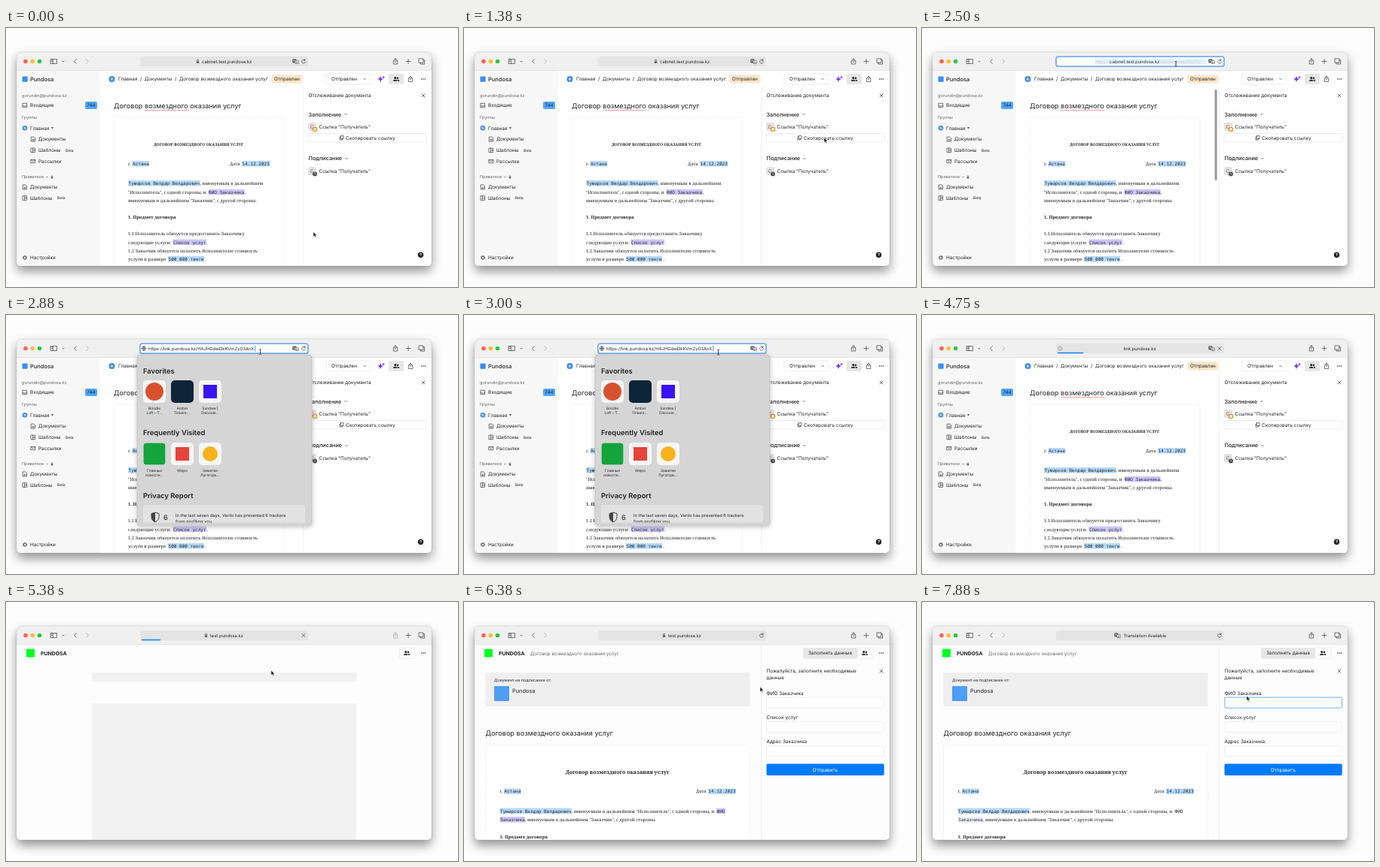
Animation, 600 px wide and 345 px high, one loop 8.01 s. Source, as an HTML page:

```html
<!DOCTYPE html>
<html lang="ru">
<head>
<meta charset="utf-8">
<title>Отправка документа</title>
<style>
  html, body { margin: 0; width: 100%; height: 100%; overflow: hidden; background: #fdfdfd; }
  svg { display: block; width: 100vw; height: 100vh; }
  text { font-family: Inter, Roboto, sans-serif; fill: #222; text-rendering: geometricPrecision; white-space: pre; }
  .serif { font-family: "Noto Serif", "Liberation Serif", serif; }
  .mono { font-family: "Noto Sans Mono", "DejaVu Sans Mono", monospace; }
  .mid { text-anchor: middle; }
  .bold { font-weight: 700; }
  .semi { font-weight: 600; }
  .medium { font-weight: 500; }
  .grey { fill: #666; }
  .line { fill: none; stroke: #444; stroke-width: .75; stroke-linecap: round; stroke-linejoin: round; }
  .pale { stroke: #aaa; }
</style>
</head>
<body>
<svg id="stage" viewBox="0 0 600 345" preserveAspectRatio="none"></svg>
<script>
const LOOP = 8010, STEP = 125, END = 9000;
const BLUE = '#b5d9fb', VIOLET = '#cbc8fb', ACCENT = '#007aff';
const TITLE = 'Договор возмездного оказания услуг';

// Markup helpers
const text = (x, y, s, size = 6.4, cls = '', extra = '') =>
  `<text x="${x}" y="${y}" font-size="${size}" class="${cls}" ${extra}>${s}</text>`;
const rect = (x, y, w, h, fill, rx = 0, extra = '') =>
  `<rect x="${x}" y="${y}" width="${w}" height="${h}" rx="${rx}" fill="${fill}" ${extra}/>`;
const box = (x, y, w, h, stroke = '#e6e6e6', fill = '#fff', rx = 2) =>
  rect(x, y, w, h, fill, rx, `stroke="${stroke}" stroke-width=".7"`);
const dot = (x, y, r, fill, extra = '') => `<circle cx="${x}" cy="${y}" r="${r}" fill="${fill}" ${extra}/>`;
const line = (x, y, d, cls = '') => `<path transform="translate(${x} ${y})" class="line ${cls}" d="${d}"/>`;
const serif = (x, y, s, size = 5.85, cls = '') => text(x, y, s, size, 'serif ' + cls);
const field = (x, y, s, fill) =>
  rect(x - .5, y - 5.9, s.length * 3.63 + 1, 7.5, fill, 1) + text(x, y, s, 6.05, 'mono');

// Icons, drawn around their centre
const cross = (x, y) => line(x, y, 'M-2-2L2 2M2-2L-2 2');
const down = (x, y, s = 1.3) => line(x, y, `M${-s} ${-s / 2}L0 ${s / 2}L${s} ${-s / 2}`);
const dots = (x, y) => [-2.3, 0, 2.3].map(d => dot(x + d, y, .75, '#222')).join('');
const page = (x, y) => line(x, y, 'M-2.4-3H1L2.6-1.3V3H-2.4ZM-1 .2H1M-1 1.6H1');
const layout = (x, y) => line(x, y, 'M-2.6-2.8H2.6V2.8H-2.6ZM-.4-2.8V2.8M-.4 0H2.6');
const share = (x, y, cls) => line(x, y, 'M-1.2-1.3H-2.7V3.5H2.7V-1.3H1.2M0 1.2V-3.7M-1.5-2.3L0-3.8L1.5-2.3', cls);
const lock = (x, y, s = 1) => `<g transform="translate(${x} ${y}) scale(${s})">` +
  rect(-1.7, -.4, 3.4, 2.9, '#666', .5) + line(0, 0, 'M-1-.4V-1.4A1 1 0 0 1 1-1.4V-.4') + '</g>';
const globe = (x, y) => dot(x, y, 2.7, 'none', 'stroke="#555" stroke-width=".7"') +
  line(x, y, 'M-2.7 0H2.7M0-2.7Q-2.2 0 0 2.7Q2.2 0 0-2.7');
const home = (x, y, r) => dot(x, y, r, '#2c8df0') +
  dot(x, y, r * .4, '#fff') + line(x, y, `M0 ${-r}V${r}M${-r} ${-r / 2}L${r} ${r / 2}`, 'pale');
const people = (x, y) => dot(x - 1.3, y - 1.4, 1.5, '#222') + dot(x + 1.9, y - 1.2, 1.2, '#222') +
  `<path transform="translate(${x} ${y})" fill="#222" d="M-4.2 2.8Q-4.2.7-1.3.7T1.5 2.8ZM2.1 2.8Q2.1 1.4 1.4.8Q4.2.4 4.3 2.8Z"/>`;
const translate = (x, y) => box(x - 4, y - 3, 4.8, 4.6, '#666', '#777', 1) + box(x - .5, y - 1.4, 4.5, 4.4, '#666', '#eee', 1) +
  text(x + .5, y + 2.1, 'A', 3.6) + line(x, y, 'M-2.9-1H-.7M-1.8-2V-1', 'pale');
const reload = (x, y) => line(x, y, 'M1.7-1.6A2.4 2.4 0 1 0 2.4.4M2-3V-1.4H.4');

const sideItem = (x, y, icon, label) => icon(x - 7, y - 2.3) + text(x, y, label);

const toolbar = () =>
  rect(14, 32, 551, 25, '#f0f0f0') + rect(14, 56.5, 551, .6, '#dedede') +
  ['#ff5f57', '#febc2e', '#28c840'].map((c, i) => dot(26 + i * 9.3, 44.5, 2.8, c)).join('') +
  line(63.5, 44.5, 'M-4-3H4V3H-4ZM-1.2-3V3M-3-1.5H-2.2M-3 0H-2.2') + down(76, 44.7, 1.1) +
  line(92, 44.5, 'M1.3-2.8L-1.5 0L1.3 2.8') + line(108, 44.5, 'M-1.3-2.8L1.5 0L-1.3 2.8', 'pale') +
  rect(178, 38, 223, 13.3, '#e4e4e4', 3) +
  line(534, 44.5, 'M-3 0H3M0-3V3') + line(552, 44.5, 'M-3.6-3.6H1.8V1.8H-3.6ZM1.8-1.8H3.6V3.6H-1.8V1.8');

const sidebar = () =>
  rect(14, 57, 110.5, 260, '#f7f7f7') + rect(21.5, 64.5, 7.2, 7.2, '#3a8ff0', 1) +
  text(32, 71, 'Pundosa', 7.5, 'medium') + text(21, 92, 'gorundin@pundosa.kz', 5.6, 'grey') +
  sideItem(32, 105.3, (x, y) => line(x, y, 'M-2.7-2.7H2.7V2.7H-2.7ZM-2.7.7H-1Q0 2.4 1 .7H2.7'), 'Входящие') +
  rect(105, 98, 16, 10, '#4fa8fa', 2) + text(113, 105.3, '744', 6.4, 'mid') +
  text(21, 121.3, 'Группы', 5.5, 'grey') + sideItem(32, 135.6, (x, y) => home(x, y, 3.3), 'Главная') +
  '<path d="M59.8 132.2h3.4l-1.7 2.1z" fill="#333"/>' +
  sideItem(43, 150.4, page, 'Документы') + sideItem(43, 165.2, layout, 'Шаблоны') + text(79, 164.7, 'Beta', 5) +
  sideItem(43, 179.8, (x, y) => line(x, y, 'M-2.8-2H2.8V2.2H-2.8ZM-2.8-2L0 .6L2.8-2'), 'Рассылки') +
  text(21, 200.4, 'Приватное', 5.5, 'grey') + down(54.5, 198.6, .8) + lock(61, 198.6, .8) +
  sideItem(32, 214.2, page, 'Документы') + sideItem(32, 228.8, layout, 'Шаблоны') + text(68, 228.3, 'Beta', 5) +
  sideItem(32, 308.2, (x, y) => dot(x, y, 2.3, 'none', 'stroke="#555" stroke-width="1.3" stroke-dasharray="1.2 .6"') +
    dot(x, y, 1.6, 'none', 'stroke="#555" stroke-width=".7"'), 'Настройки');

const recipient = y => rect(401, y, 11, 11, '#e2e2e2', 2.5) + text(406, y + 7.8, 'С', 6.4, 'mid grey');

const tracking = () =>
  rect(394.6, 79, .6, 238, '#e4e4e4') +
  box(425, 61, 59, 14) + text(432, 70.3, 'Отправлен') + down(476, 68) +
  '<path d="M497 63.5Q497.5 67.5 501 68Q497.5 68.5 497 72.5Q496.500 68.500 493 68Q496.500 67.500 497 63.500ZM501 63.500l.6 1.600 1.600.6-1.600.6-.6 1.600-.6-1.600-1.600-.6 1.600-.6z" fill="#7a3cf0"/>' +
  rect(508, 61, 20, 14, '#e6e6e6', 2) + people(518, 68) + share(537, 68) + dots(554, 68) +
  text(401.5, 92.3, 'Отслеживание документа', 6.5) + cross(554, 90) +
  text(401.5, 117.6, 'Заполнение', 7.3, 'medium') + down(451, 115) +
  recipient(126) + dot(410, 135, 2.6, '#fff', 'stroke="#f08c1a" stroke-width="1.4"') + text(415.5, 133.8, 'Ссылка "Получатель"') +
  box(401, 140.5, 157.5, 11.5) + line(445.5, 146.3, 'M-1-2.700H2.500V1.200H-1ZM-1-1.200H-2.500V2.700H1V1.200') +
  text(451, 148.500, 'Скопировать ссылку') +
  text(401.5, 176.4, 'Подписание', 7.3, 'medium') + down(452, 174) +
  recipient(185) + dot(410, 194.5, 3, '#555') + line(410, 194.5, 'M0-1.500V0H1.200', 'pale') + text(415.5, 192.6, 'Ссылка "Получатель"') +
  dot(550.5, 302.3, 3.7, '#222') + text(550.5, 304.4, '?', 5.5, 'mid bold', 'style="fill:#fff"');

const cabinet = () =>
  rect(14, 57, 551, 260, '#fff') + sidebar() + home(140.5, 68, 4) +
  text(149, 70.3, 'Главная') + text(178, 70.3, '/') + text(184, 70.3, 'Документы') + text(224, 70.3, '/') +
  text(230, 70.3, TITLE, 6.35) + rect(352.5, 62.5, 41, 11, '#fde6c8', 2) + text(356, 70.3, 'Отправлен', 6.35) +
  text(143, 106.8, TITLE, 9.15) +
  '<path d="M185 109.500H243" stroke="#f04848" stroke-width="1" stroke-dasharray="1 1"/>' +
  rect(143, 119, 226, 220, '#fff', 1, 'stroke="#e8e8e8" stroke-width=".7" stroke-dasharray="2 1"') +
  serif(255.5, 156.5, TITLE.toUpperCase(), 5.2, 'bold mid') +
  serif(162, 183, 'г.') + field(168, 183, 'Астана', BLUE) + serif(297, 183, 'Дата') + field(313.5, 183, '14.12.2023', BLUE) +
  field(162.5, 209, 'Тумарсов Велдар Велдарович', BLUE) + serif(257.5, 209, ', именуемым в дальнейшем') +
  serif(162, 220.7, '"Исполнитель", с одной стороны, и') + field(269, 220.7, 'ФИО Заказчика', VIOLET) + serif(317, 220.7, ',') +
  serif(162, 232.3, 'именуемым в дальнейшем "Заказчик", с другой стороны.') +
  serif(162, 254.4, '1. Предмет договора', 5.85, 'bold') +
  serif(162, 276.3, '1.1 Исполнитель обязуется предоставить Заказчику') +
  serif(162, 287.5, 'следующие услуги:') + field(222, 287.5, 'Список услуг', VIOLET) + serif(267, 287.5, '.') +
  serif(162, 298.8, '1.2 Заказчик обязуется оплатить Исполнителю стоимость') +
  serif(162, 310, 'услуги в размере') + field(215.5, 310, '500 000 тенге', BLUE) + serif(264.5, 310, '.') + tracking();

const linkHeader = () =>
  rect(14, 57, 551, 260, '#fdfdfd') + rect(27, 62.5, 11, 11, '#0f2', 1) +
  text(46, 70.8, 'PUNDOSA', 6.9, 'bold') + box(522, 61, 21, 14.5) + people(532, 68) + dots(554, 68);

const skeleton = () => rect(114, 94, 351, 12, '#f0f0f0') + rect(114, 135, 351, 182, '#f2f2f2');

const formRow = (y, label) => text(401.5, y, label) + box(401.8, y + 3.6, 155.700, 14);

const form = () =>
  text(88, 70.6, TITLE, 6.35, 'grey') + rect(394.6, 57, .6, 260, '#e2e2e2') +
  rect(450, 61, 72, 14.5, '#e6e6e6', 2) + text(486, 70.4, 'Заполнить данные', 6.4, 'mid') +
  rect(28.5, 94, 351, 45, '#efefef', 1) + text(40, 106.3, 'Документ на подписание от:', 5.4) +
  rect(40, 112, 20, 20, '#4f9df5', 1) + text(64, 121, 'Pundosa', 7.4) + text(28.5, 178, TITLE, 9.15) +
  rect(28.5, 191, 351, 140, '#fff', 1, 'stroke="#e8e8e8" stroke-width=".7" stroke-dasharray="2 1"') +
  serif(203.7, 228.5, TITLE, 7, 'bold mid') +
  serif(47.5, 254.3, 'г.') + field(53.5, 254.3, 'Астана', BLUE) + serif(308, 254.3, 'Дата') + field(324.3, 254.3, '14.12.2023', BLUE) +
  field(48, 280.5, 'Тумарсов Велдар Велдарович', BLUE) +
  serif(143, 280.5, ', именуемым в дальнейшем "Исполнитель", с одной стороны, и') +
  serif(81, 292, ', именуемым в дальнейшем "Заказчик", с другой стороны.') +
  serif(47.5, 314.5, '1. Предмет договора', 5.85, 'bold') +
  text(401.5, 94, 'Пожалуйста, заполните необходимые') + text(401.5, 103, 'данные') + cross(554, 92) +
  formRow(123.5, 'ФИО Заказчика') + formRow(155.8, 'Список услуг') + formRow(188, 'Адрес Заказчика') +
  rect(401.5, 215.5, 156.2, 15.5, ACCENT, 2) + text(479.5, 225.6, 'Отправить', 6.4, 'mid', 'style="fill:#fff"');

const customer = fill => field(335.5, 280.5, 'ФИО', fill) + field(48, 292, 'Заказчика', fill);

const address = (x, s, extra) => text(x, 46.8, s, 5.85, '', extra);
const focusRing = () => rect(178, 38.2, 223, 13, '#fff', 3, 'stroke="#76b0f2" stroke-width="1.800"');

const tile = (i, y, shape, first, second) => {
  const x = 182 + i * 37;
  return rect(x, y, 30, 30, '#f6f6f6', 5) + shape(x + 15, y + 15) +
    text(x + 15, y + 38.5, first, 4.8, 'mid') + text(x + 15, y + 44.5, second, 4.8, 'mid');
};
const square = (size, fill, rx = 0) => (x, y) => rect(x - size / 2, y - size / 2, size, size, fill, rx);
const circle = (r, fill) => (x, y) => dot(x, y, r, fill);

const startPanel = () =>
  rect(174, 53, 232, 227, '#d5d5d5', 4, 'stroke="#b8b8b8" stroke-width=".6" filter="url(#soft)"') +
  text(182, 77.5, 'Favorites', 9.4, 'semi') +
  tile(0, 87, circle(12, '#d8512f'), 'Brindle', 'Loft – T...') +
  tile(1, 87, square(30, '#0e2439', 5), 'Amber', 'Tinkers:...') +
  tile(2, 87, square(18, '#3a13f5'), 'Sundew |', 'Discover...') +
  text(182, 160, 'Frequently Visited', 9.4, 'semi') +
  tile(0, 170, square(29, '#15a33c', 4), 'Главные', 'новости...') +
  tile(1, 170, square(18, '#e5443a'), 'Wispo', '') +
  tile(2, 170, circle(10, '#f8b21c'), 'Заметки', 'Лугогорь...') +
  text(182, 243.5, 'Privacy Report', 9.4, 'semi') +
  '<g clip-path="url(#report)">' + rect(182, 253, 215, 40, '#e2e2e2', 4) +
  '<path d="M198 263l5 1.500v4q0 5-5 7.500q-5-2.500-5-7.500v-4z" fill="none" stroke="#444" stroke-width="1"/><path d="M198 263v13q-5-2.500-5-7.500v-4z" fill="#444"/>' +
  text(209, 273, '6', 9.4) + text(225, 268.5, 'In the last seven days, Verilo has prevented 6 trackers', 5.75) +
  text(225, 276.5, 'from profiling you.', 5.75) + '</g>';

// [from, to, markup] in drawing order
const scenes = [
  [0, 4875, cabinet()],
  [2250, 2750, rect(388.6, 82, 3, 121, '#999', 1.5)],
  [4875, END, linkHeader()],
  [5000, 5875, skeleton()],
  [5875, END, form()],
  [5875, 7250, customer(VIOLET)],
  [7250, END, customer('#eeeefc') + rect(401.8, 127.1, 155.7, 14, '#fff', 2, 'stroke="#8cc4fb" stroke-width="1.300"')],
  [0, END, toolbar()],
  [0, 4875, share(517, 44.5)],
  [4875, 5875, share(517, 44.5, 'pale')],
  [5875, END, share(517, 44.5)],
  [0, 2500, lock(254.5, 44.6) + address(260, 'cabinet.test.pundosa.kz')],
  [2500, 3625, focusRing()],
  [2500, 2625, rect(230, 40.7, 148, 8, '#dbeafb', 0, 'opacity=".6"') +
    address(230, 'https://cabinet.test.pundosa.kz/documents/48213/', 'opacity=".2"') + address(249, 'cabinet.test.pundosa.kz', 'opacity=".8"')],
  [2625, 2875, rect(188.5, 40.7, 143, 8, '#b3d6fb') + globe(183, 44.6) + address(189, 'https://cabinet.test.pundosa.kz/documents/48213/')],
  [2750, 3625, startPanel()],
  [2875, 3625, globe(183, 44.6) + address(189, 'https://link.pundosa.kz/HAJHGdeiDkKVmZy03AnX') + rect(330.5, 41, .8, 7.500, ACCENT)],
  [0, 4875, translate(384.5, 44.6)],
  [0, 3625, reload(395, 44.6)],
  [3625, 4875, dot(183.5, 44.6, 2.6, 'none', 'stroke="#888" stroke-width=".7"') + line(183.5, 44.6, 'M0-1.200V1.200', 'pale') + address(267.5, 'link.pundosa.kz')],
  [3625, 6000, cross(395, 44.6)],
  [4875, 6750, lock(265.5, 44.6) + address(271, 'test.pundosa.kz')],
  [6000, END, reload(395, 44.6)],
  [6750, END, translate(259.5, 44.6) + address(267.5, 'Translation Available')]
];

const loading = [[3625, 14], [3750, 23], [4750, 34], [4874, 34], [4875, 14], [5375, 25], [5625, 60], [5875, 219]];
const pointer = [[0, 408, 271.5], [125, 408, 271.5], [1000, 478, 146], [1500, 478, 146], [2250, 337, 47.5],
  [4875, 340, 58], [5375, 352, 91], [5750, 352, 91], [6375, 393, 113], [7000, 431, 125]];

function at(table, time) {
  const i = table.findIndex(row => row[0] > time);
  if (i < 0) return table[table.length - 1].slice(1);
  if (i === 0) return table[0].slice(1);
  const a = table[i - 1], b = table[i], u = (time - a[0]) / (b[0] - a[0]), k = u * u * (3 - 2 * u);
  return a.slice(1).map((v, n) => v + (b[n + 1] - v) * k);
}

const stage = document.getElementById('stage');
stage.innerHTML = `<defs>
  <clipPath id="window">${rect(14, 32, 551, 285, '#000', 6)}</clipPath>
  <clipPath id="report">${rect(182, 253, 215, 23.5, '#000')}</clipPath>
  <filter id="shadow" x="-10%" y="-10%" width="120%" height="125%"><feDropShadow dx="0" dy="7" stdDeviation="7" flood-opacity=".42"/></filter>
  <filter id="soft"><feDropShadow dx="0" dy="2" stdDeviation="3" flood-opacity=".25"/></filter></defs>` +
  rect(0, 0, 600, 345, '#fdfdfd') + rect(14, 32, 551, 285, '#fff', 6, 'filter="url(#shadow)"') +
  `<g clip-path="url(#window)">${scenes.map(s => `<g class="scene">${s[2]}</g>`).join('')}
  <rect id="bar" x="180" y="49.8" height="1.400" fill="${ACCENT}"/></g>` +
  rect(14, 32, 551, 285, 'none', 6, 'stroke="#000" stroke-opacity=".15" stroke-width=".6"') +
  `<path id="arrow" d="M0 0V6.500L1.500 5.200L2.600 7.600L3.700 7.100L2.700 4.800H4.600Z" fill="#111" stroke="#fff" stroke-width=".5"/>
  <path id="beam" d="M-1.300-3.500Q0-3.500 0-2.500Q0-3.500 1.300-3.500M0-2.500V2.500M-1.300 3.500Q0 3.500 0 2.500Q0 3.500 1.300 3.500" fill="none" stroke="#222" stroke-width=".8"/>`;

const groups = stage.querySelectorAll('.scene');
const [bar, arrow, beam] = ['bar', 'arrow', 'beam'].map(id => document.getElementById(id));
const show = (el, on) => { el.style.display = on ? '' : 'none'; };

function draw(now) {
  const time = Math.min(63, Math.floor(now % LOOP / STEP)) * STEP;
  scenes.forEach(([from, to], i) => show(groups[i], time >= from && time < to));
  show(bar, time >= 3625 && time < 6000);
  bar.setAttribute('width', at(loading, time)[0]);
  const [x, y] = at(pointer, time);
  const visible = time < 3500 || time >= 4875;
  show(arrow, visible && y > 52);
  show(beam, visible && y <= 52);
  [arrow, beam].forEach(el => el.setAttribute('transform', `translate(${x} ${y})`));
}

const start = performance.now();
function tick() {
  draw(performance.now() - start);
  requestAnimationFrame(tick);
}
tick();
</script>
</body>
</html>
```
